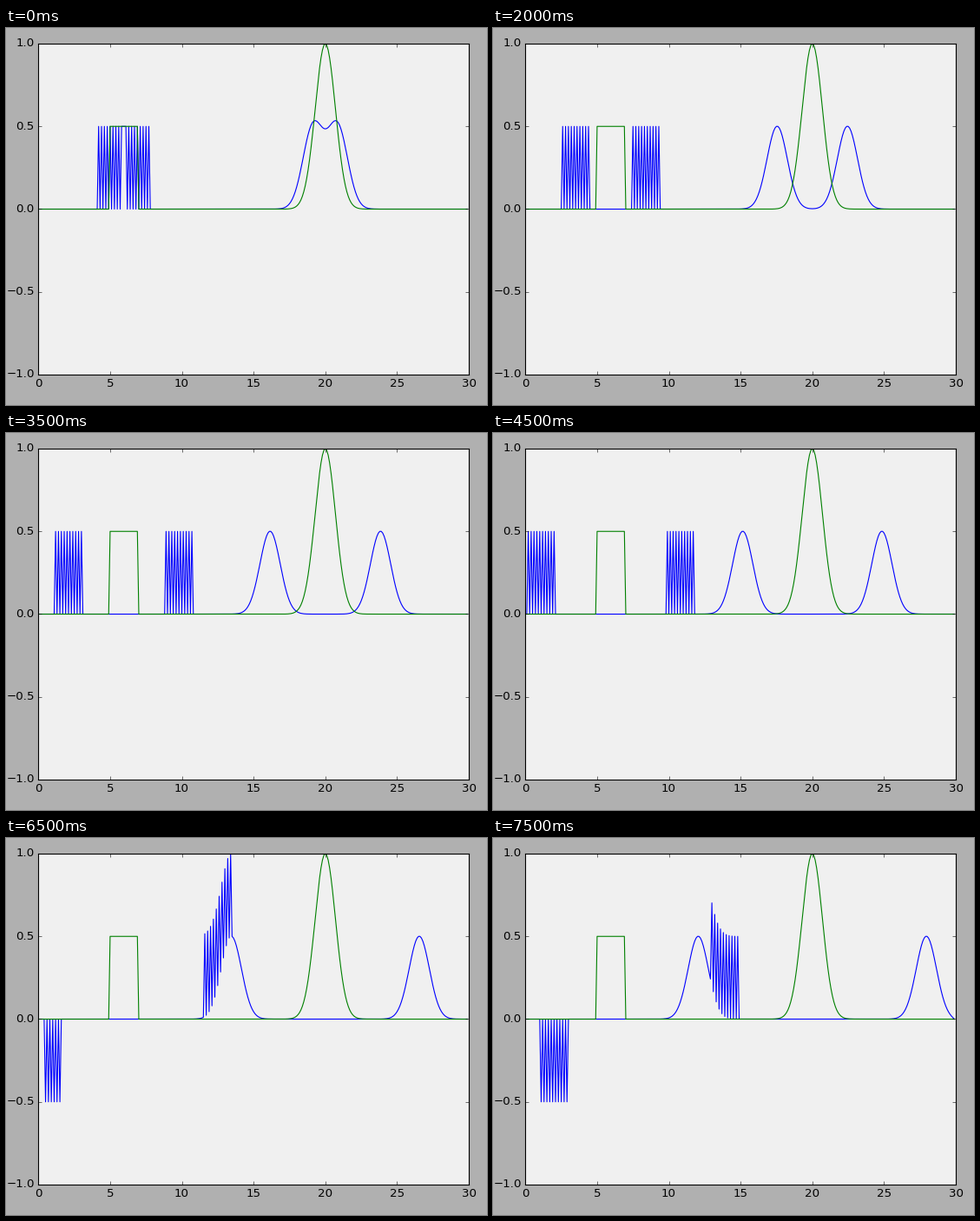
A matplotlib script for the animation above (8000 ms loop, 554 by 434 pixels).

```python
import numpy as np
import matplotlib.pyplot as plt
from matplotlib.animation import FuncAnimation

W, H, DPI = 554, 434, 80
LEFT, RIGHT, TOP, BOTTOM = 37.3, 533.0, 18.0, 399.0  # axes box in pixels

# Time steps shown one after another; the pace is uneven
STEPS = [9, 13, 18, 21, 25, 30, 34, 39, 43, 49, 52, 55, 60, 66, 73, 80]

plt.rcParams.update({
    "font.family": "DejaVu Sans",
    "font.size": 12,
    "axes.linewidth": 1.0,
    "axes.axisbelow": False,
    "axes.unicode_minus": True,
    "lines.linewidth": 1.0,
    "ytick.alignment": "center",
})


def initial_shape(n=300):
    """A box between 5 and 7 and a bell around 20."""
    i = np.arange(n)
    x = i / 10
    u = np.exp(-(x - 20) ** 2)
    u[(i >= 50) & (i < 70)] = 0.5
    u[[0, -1]] = 0
    return x, u


def solve(u0, steps):
    """Leapfrog wave equation at Courant number 1 with fixed ends."""
    waves = [u0, u0]
    while len(waves) <= steps:
        prev, cur = waves[-2:]
        new = np.zeros_like(cur)
        new[1:-1] = cur[2:] + cur[:-2] - prev[1:-1]
        waves.append(new)
    return waves


x, start = initial_shape()
waves = solve(start, max(STEPS))

fig = plt.figure(figsize=(W / DPI, H / DPI), dpi=DPI, facecolor="#b0b0b0")
ax = fig.add_axes(
    [LEFT / W, 1 - BOTTOM / H, (RIGHT - LEFT) / W, (BOTTOM - TOP) / H],
    facecolor="#f0f0f0",
)
wave_line, = ax.plot(x, waves[STEPS[0]], color="#0000ff")
ax.plot(x, start, color="#008000")

ax.set_xlim(0, 30)
ax.set_ylim(-1, 1)
ax.set_xticks(np.arange(0, 31, 5))
ax.set_yticks(np.arange(-1, 1.1, 0.5))
ax.tick_params(direction="in", length=4, width=0.5, pad=4, top=True, right=True)


def update(frame):
    wave_line.set_ydata(waves[STEPS[frame]])
    return wave_line,


anim = FuncAnimation(fig, update, frames=len(STEPS), interval=500,
                     repeat=True, repeat_delay=0, blit=False)
plt.show()
```
